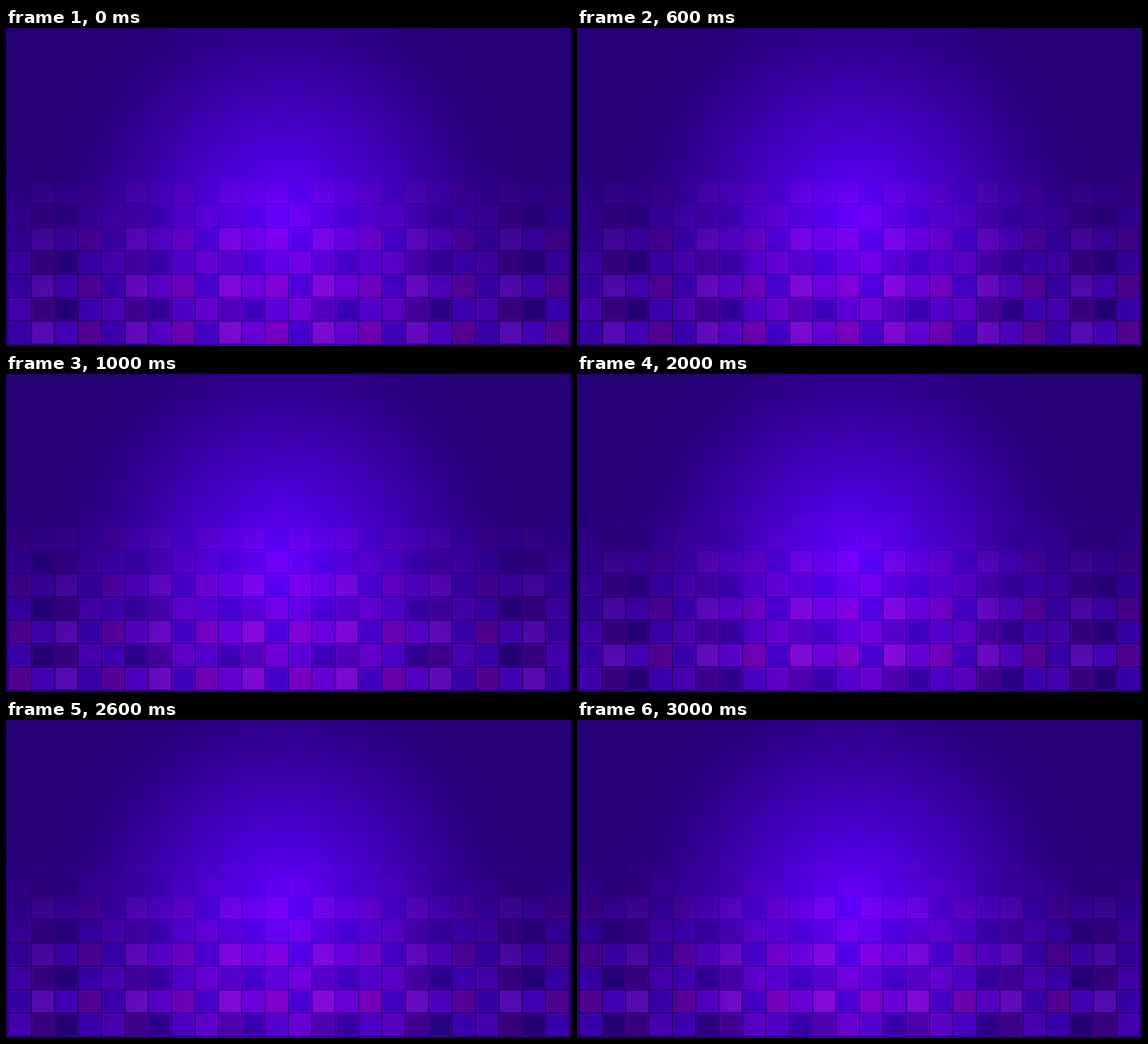
An HTML page with a canvas for the animation above (4000 ms loop, 998x561 px).

```html
<!DOCTYPE html>
<html>
<head>
<meta charset="utf-8">
<style>
html, body { margin: 0; width: 100%; height: 100%; overflow: hidden; background: #260077; }
canvas { display: block; }
</style>
</head>
<body>
<canvas id="stage" width="998" height="561"></canvas>
<script>
const W = 998, H = 561;
const ctx = document.getElementById('stage').getContext('2d');
const COLS = 24, ROWS = 8, PITCH = 41.3, LEFT = 3.4, BOTTOM = 558.2;

// Radial glow shared by every surface; only the inner and outer colours differ.
function glow(inner, outer) {
  const g = ctx.createRadialGradient(490, 328, 0, 490, 328, 430);
  for (const [pos, k] of [[0, 1], [0.25, 0.72], [0.5, 0.42], [0.75, 0.13], [0.88, 0.04], [1, 0]]) {
    const mix = outer.map((o, i) => Math.round(o + (inner[i] - o) * k));
    g.addColorStop(pos, `rgb(${mix})`);
  }
  return g;
}

const backdrop = glow([92, 0, 255], [38, 0, 119]);
const gap = glow([72, 0, 215], [36, 0, 108]);
const rim = glow([176, 0, 255], [90, 0, 172]);

const brightRow = [
  glow([92, 0, 255], [53, 0, 164]),
  glow([180, 10, 255], [86, 10, 178]),
  glow([150, 0, 255], [66, 0, 180]),
  glow([172, 0, 255], [80, 0, 142])
];
const darkRow = [
  glow([150, 0, 255], [66, 0, 172]),
  glow([110, 0, 255], [54, 0, 122]),
  glow([86, 0, 255], [34, 0, 114]),
  glow([122, 0, 255], [54, 0, 170])
];

const fade = ctx.createLinearGradient(0, 236, 0, 500);
fade.addColorStop(0, 'rgba(0,0,0,0)');
fade.addColorStop(1, '#000');

function tile(x, y, fill) {
  ctx.fillStyle = fill;
  ctx.fillRect(x + 1.5, y + 1.5, PITCH - 3, PITCH - 3);
  ctx.strokeStyle = rim;
  ctx.lineWidth = 1;
  ctx.globalAlpha = 0.75;
  ctx.beginPath();
  ctx.roundRect(x + 1.8, y + 1.8, PITCH - 3.6, PITCH - 3.6, 1.5);
  ctx.stroke();
  ctx.globalAlpha = 0.2;
  ctx.strokeRect(x + 4, y + 4, PITCH - 8, PITCH - 8);
  ctx.globalAlpha = 1;
}

// Odd steps mirror the pattern; the second half of the loop swaps the rows.
function draw(step) {
  const mirrored = step % 2, swapped = step >> 1;
  ctx.globalCompositeOperation = 'source-over';
  ctx.clearRect(0, 0, W, H);
  ctx.fillStyle = gap;
  ctx.fillRect(LEFT, BOTTOM - ROWS * PITCH, COLS * PITCH, ROWS * PITCH);
  for (let row = 0; row < ROWS; row++) {
    const fills = (row + swapped) % 2 ? darkRow : brightRow;
    for (let col = 0; col < COLS; col++) {
      const kind = (mirrored ? COLS - 1 - col : col) % 4;
      tile(LEFT + col * PITCH, BOTTOM - (row + 1) * PITCH, fills[kind]);
    }
  }
  ctx.globalCompositeOperation = 'destination-in';
  ctx.fillStyle = fade;
  ctx.fillRect(0, 0, W, H);
  ctx.globalCompositeOperation = 'destination-over';
  ctx.fillStyle = backdrop;
  ctx.fillRect(0, 0, W, H);
}

let shown = 0;
function tick() {
  const step = Math.floor(performance.now() / 1000) % 4;
  if (step !== shown) draw(shown = step);
  requestAnimationFrame(tick);
}
draw(0);
tick();
</script>
</body>
</html>
```
